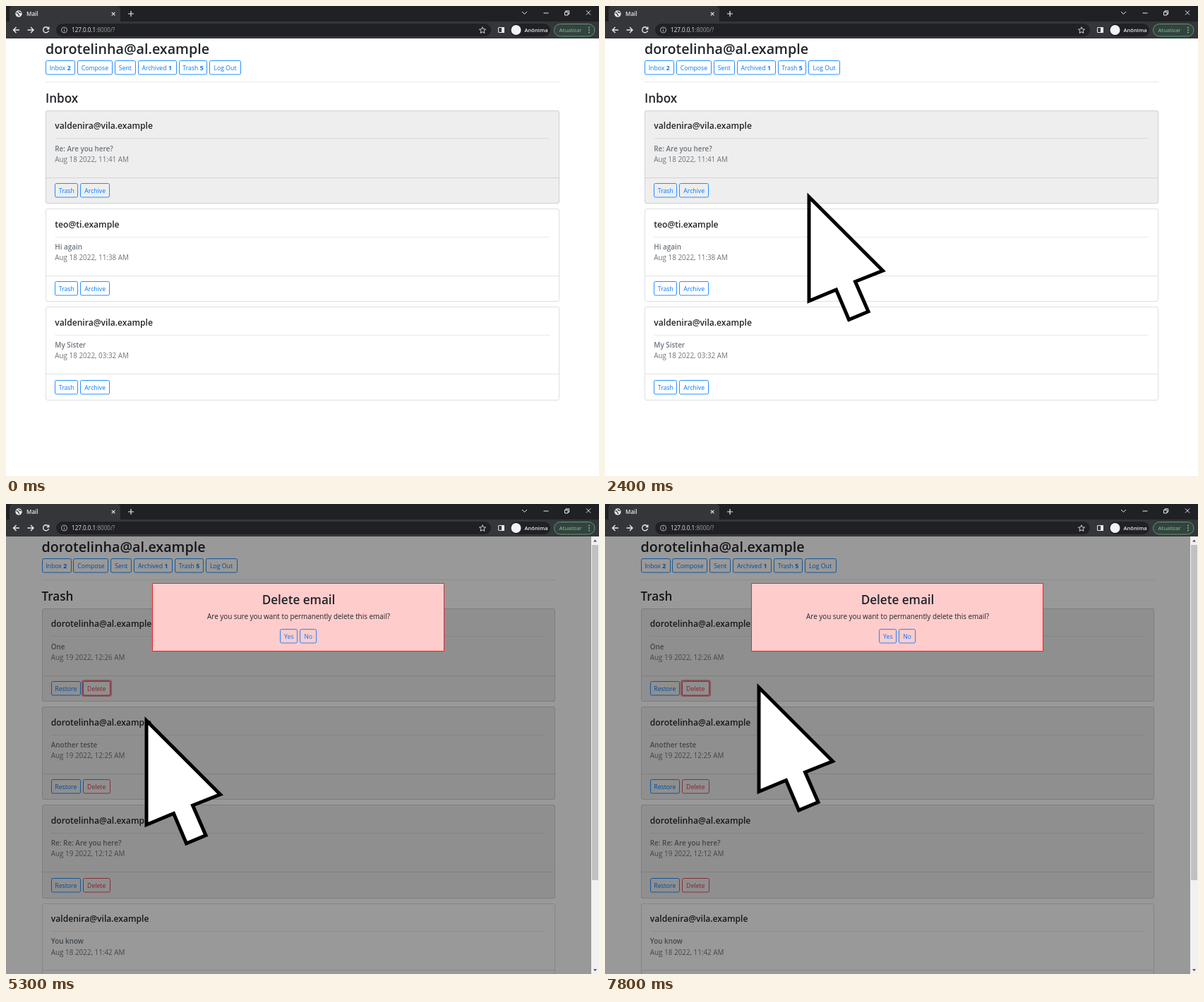
An HTML page with a canvas for the animation above (8000 ms loop, 840 by 666 pixels).

```html
<!DOCTYPE html>
<html lang="en">
<head>
<meta charset="utf-8">
<title>Mail</title>
<style>
  html, body { margin: 0; width: 100%; height: 100%; overflow: hidden; background: #fff; }
  canvas { display: block; }
</style>
</head>
<body>
<canvas id="stage" width="840" height="666"></canvas>
<script>
const ctx = document.getElementById('stage').getContext('2d');
const LOOP = 8000;
const BLUE = '#007bff', RED = '#dc3545', INK = '#212529', MUTED = '#6c757d';
const USER = 'dorotelinha@al.example';
const FRIEND = 'valdenira@vila.example';
const OTHER = 'teo@ti.example';

const NAV = [['Inbox', 42, 2], ['Compose', 50], ['Sent', 30], ['Archived', 55, 1], ['Trash', 40.5, 5], ['Log Out', 45]];
const TRASH_ACTIONS = [['Restore', 42], ['Delete', 39]];
const INBOX_ACTIONS = [['Trash', 33], ['Archive', 42]];

const PAGES = {
  inbox: {
    title: 'Inbox', actions: INBOX_ACTIONS, mails: [
      [FRIEND, 'Re: Are you here?', 'Aug 18 2022, 11:41 AM', true],
      [OTHER, 'Hi again', 'Aug 18 2022, 11:38 AM', false],
      [FRIEND, 'My Sister', 'Aug 18 2022, 03:32 AM', false]]
  },
  archive: {
    title: 'Archive', focus: 'Archived', actions: [['Trash', 33], ['Unarchive', 52]],
    mails: [[OTHER, 'Hello', 'Aug 18 2022, 01:43 AM', true]]
  },
  trash: {
    title: 'Trash', focus: 'Trash', actions: TRASH_ACTIONS, scrolls: true, mails: [
      [USER, 'One', 'Aug 19 2022, 12:26 AM', true],
      [USER, 'Another teste', 'Aug 19 2022, 12:25 AM', true],
      [USER, 'Re: Re: Are you here?', 'Aug 19 2022, 12:12 AM', true],
      [FRIEND, 'You know', 'Aug 18 2022, 11:42 AM', false]]
  }
};
PAGES.confirm = { ...PAGES.trash, focus: 'Delete', modal: true };

// [start time, page]
const SCENES = [[0, 'inbox'], [2900, 'archive'], [3900, 'trash'], [5300, 'confirm'], [6200, 'trash'], [7800, 'confirm']];

// [start time, x, y] of the pointer's hot spot
const POINTER = [
  [500, 476, 105], [1000, 460, 182], [1200, 449, 259], [1300, 446, 295], [1400, 443, 328],
  [1600, 438, 395], [1700, 434, 432], [1800, 430, 468],
  [2000, 422, 535], [2100, 396, 468], [2200, 362, 400], [2300, 325, 332], [2400, 286, 264.5],
  [2500, 256, 200], [2600, 232, 135], [2700, 215, 90],
  [2900, 300, 328], [3400, 340, 191], [3600, 300, 130], [3700, 266, 90],
  [3900, 270, 115], [4900, 220, 191], [5100, 130, 259], [5300, 196, 301],
  [5800, 340, 270], [5900, 482, 225], [6000, 428, 187], [6200, 390, 98],
  [7200, 320.5, 127], [7300, 270, 165], [7400, 215, 200], [7500, 165, 235], [7600, 130, 267],
  [7800, 215, 254]
];

const ARROW = new Path2D('M3 6V153.5L41.5 137.5L59.5 180L87 168.5L68.5 126L107.5 110.5Z');
const HAND = new Path2D('M-12 99L-13.5 16A13.5 13.5 0 0 1 13.5 16V59C18 49 33 50 36 67L35 60' +
  'C44 54 56 59 59 75L58 69C66 62 82.5 65 82.5 81C82.5 130 82 125 73 170.5H-8.5L-30 126' +
  'C-36 112 -38 95 -43 82C-45 68 -23 60 -16 77Z');

let pointer, clickable;

const latest = (list, t) => list.filter(entry => entry[0] <= t).pop();

const over = (x, y, w, h) => pointer &&
  pointer[1] >= x && pointer[1] < x + w && pointer[2] >= y && pointer[2] < y + h;

function hit(x, y, w, h) {
  const inside = over(x, y, w, h);
  if (inside) clickable = true;
  return inside;
}

function text(str, x, y, size, color, weight = 400, align = 'left') {
  ctx.font = `${weight} ${size}px "Open Sans", "Noto Sans", sans-serif`;
  ctx.fillStyle = color;
  ctx.textAlign = align;
  ctx.fillText(str, x, y);
  return ctx.measureText(str).width;
}

function rect(x, y, w, h, color) {
  ctx.fillStyle = color;
  ctx.fillRect(x, y, w, h);
}

function box(x, y, w, h, r, fill, stroke, lineWidth = 1) {
  ctx.beginPath();
  ctx.roundRect(x, y, w, h, r);
  if (fill) { ctx.fillStyle = fill; ctx.fill(); }
  if (stroke) { ctx.strokeStyle = stroke; ctx.lineWidth = lineWidth; ctx.stroke(); }
}

function line(d, color, width = 1.2) {
  ctx.strokeStyle = color;
  ctx.lineWidth = width;
  ctx.stroke(new Path2D(d));
}

function dot(x, y, r, color) {
  ctx.beginPath();
  ctx.arc(x, y, r, 0, 7);
  ctx.fillStyle = color;
  ctx.fill();
}

function button(x, y, [label, w, count], focused, active = true) {
  const color = label === 'Delete' ? RED : BLUE;
  const hovered = active && hit(x, y, w, 20);
  const left = Math.round(x);
  const right = Math.round(x + w);
  if (focused) box(left - 1, y - 1, right - left + 2, 22, 3, null, color + '80', 2.2);
  box(left + .5, y + .5, right - left - 1, 19.5, 2, hovered && color, color, .85);
  const ink = hovered ? '#fff' : color;
  if (!count) return text(label, x + w / 2, y + 13.6, 8.7, ink, 400, 'center');
  const labelWidth = text(label, x + 5.7, y + 13.6, 8.7, ink);
  text(count, x + 5.7 + labelWidth + 2.4, y + 13.6, 8.7, ink, 700);
}

function buttonRow(x, y, items, focus, active) {
  for (const item of items) {
    button(x, y, item, item[0] === focus, active);
    x += item[1] + 2.9;
  }
}

function mailCard(left, width, index, mail, page) {
  const [from, subject, date, read] = mail;
  const top = 148.1 + 139.3 * index;
  const x = Math.round(left);
  const y = Math.floor(top);
  const bottom = Math.floor(top + 131.4);
  const inner = left + 13.3;
  box(x, y, width, bottom - y + 1, 2.5, read ? '#eee' : '#fff');
  if (!page.modal && hit(x, y, width, 95)) box(x, y, width, 95, [2.5, 2.5, 0, 0], '#bdddff');
  box(x + .5, y + .5, width - 1, bottom - y, 2.5, null, 'rgba(0,0,0,.125)');
  rect(x + 1, Math.round(top + 94.4), width - 2, 1, 'rgba(0,0,0,.11)');
  rect(inner, Math.round(top + 39.2), width - 27, 1, 'rgba(0,0,0,.08)');
  text(from, inner, top + 26.2, 12.1, INK, 600);
  text(subject, inner, top + 57.4, 9.9, MUTED, 600);
  text(date, inner, top + 72.7, 9.9, MUTED);
  buttonRow(inner, Math.round(top + 103), page.actions, index === 0 && page.focus === 'Delete' && 'Delete', !page.modal);
}

function drawPage(page) {
  const left = page.scrolls ? 50.5 : 56;
  const width = page.scrolls ? 727 : 728;
  rect(0, 46, 840, 620, '#fff');
  text(USER, left, 67.5, 19.7, INK, 600);
  buttonRow(left, 77, NAV, page.focus, !page.modal);
  rect(Math.round(left), 107, width, 1, 'rgba(0,0,0,.09)');
  text(page.title, left, 137, 17.1, INK, 600);
  page.mails.forEach((mail, i) => mailCard(left, width, i, mail, page));
  if (page.modal) drawModal();
  if (page.scrolls) drawScrollbar();
}

function drawModal() {
  rect(0, 46, 829, 620, 'rgba(0,0,0,.4)');
  box(207.5, 112.5, 413, 96, 0, '#fcc', '#e5262b');
  text('Delete email', 414.5, 141.5, 17.1, INK, 600, 'center');
  text('Are you sure you want to permanently delete this email?', 414.5, 163, 9.9, INK, 400, 'center');
  buttonRow(388.3, 177, [['Yes', 25], ['No', 24]]);
}

function drawScrollbar() {
  rect(829, 46, 11, 620, '#f1f1f1');
  rect(830, 58, 9, 475, '#c1c1c1');
  ctx.fillStyle = '#505050';
  ctx.fill(new Path2D('M832 53.5L834.5 50.5L837 53.5ZM832 659L834.5 662L837 659Z'));
}

function drawBrowser() {
  const icon = '#e8eaed';
  rect(0, 0, 840, 22, '#202124');
  rect(0, 22, 840, 24, '#35363a');
  box(5, 0, 157, 23, [5, 5, 0, 0], '#35363a');
  dot(18, 11, 4.7, icon);
  line('M14.5 9.5Q17 10 17.5 11.5T19 14M18 7.5Q18.5 9.5 21.5 9.5', '#35363a', 1.3);
  text('Mail', 29, 14, 8, icon, 600);
  line('M149.8 8.8l4.6 4.6m0 -4.6l-4.6 4.6M173 11h8m-4 -4v8', icon);
  line('M731 8l3.5 3.5l3.5 -3.5M761.5 10h7M791.5 8.5h4.5v4.5h-4.5zM793 8.5v-1.7h4.7v4.7h-1.7M822 6.5l6 6m0 -6l-6 6', icon, 1);

  line('M19 34h-8.5m4 -4l-4 4l4 4M30.5 34h8.5m-4 -4l4 4l-4 4', icon, 1.4);
  line('M60 31.5A4 4 0 1 0 60.5 35M60.8 29.5v3h-3', icon, 1.3);
  box(71, 25, 616, 18, 9, '#202124');
  line('M78.5 34a4 4 0 1 0 8 0a4 4 0 1 0 -8 0M82.5 33.5v2.7M82.5 31.6v1', '#bdc1c6', .9);
  const hostWidth = text('127.0.0.1', 93, 37, 8.1, icon, 500);
  text(':8000/?', 93 + hostWidth, 37, 8.1, '#9aa0a6');
  line('M675 29.8l1.3 3l3.2 .3l-2.4 2.1l.7 3.2l-2.8 -1.7l-2.8 1.7l.7 -3.2l-2.4 -2.1l3.2 -.3z', icon, .9);
  box(697.5, 30.5, 8, 7, .5, null, icon);
  rect(702, 30, 4, 8, icon);
  box(714, 25, 57, 18, 9, '#202124');
  dot(722.5, 34, 7, '#f1f3f4');
  text('Anônima', 734.5, 37, 7.6, icon, 600);
  box(776.5, 25.5, 57.5, 17.5, 9, '#34433f', '#5b9a72');
  text('Atualizar', 783.5, 37, 7.8, '#81c995');
  for (const y of [30.5, 34, 37.5]) dot(826, y, .9, '#81c995');
}

function drawPointer() {
  const shape = clickable ? HAND : ARROW;
  ctx.save();
  ctx.translate(pointer[1], pointer[2]);
  ctx.miterLimit = 3;
  ctx.lineWidth = 5;
  ctx.fillStyle = '#fff';
  ctx.strokeStyle = '#000';
  ctx.fill(shape);
  ctx.stroke(shape);
  ctx.restore();
}

function frame() {
  const t = performance.now() % LOOP;
  pointer = latest(POINTER, t);
  clickable = false;
  drawPage(PAGES[latest(SCENES, t)[1]]);
  drawBrowser();
  if (pointer) drawPointer();
  requestAnimationFrame(frame);
}
frame();
</script>
</body>
</html>
```
